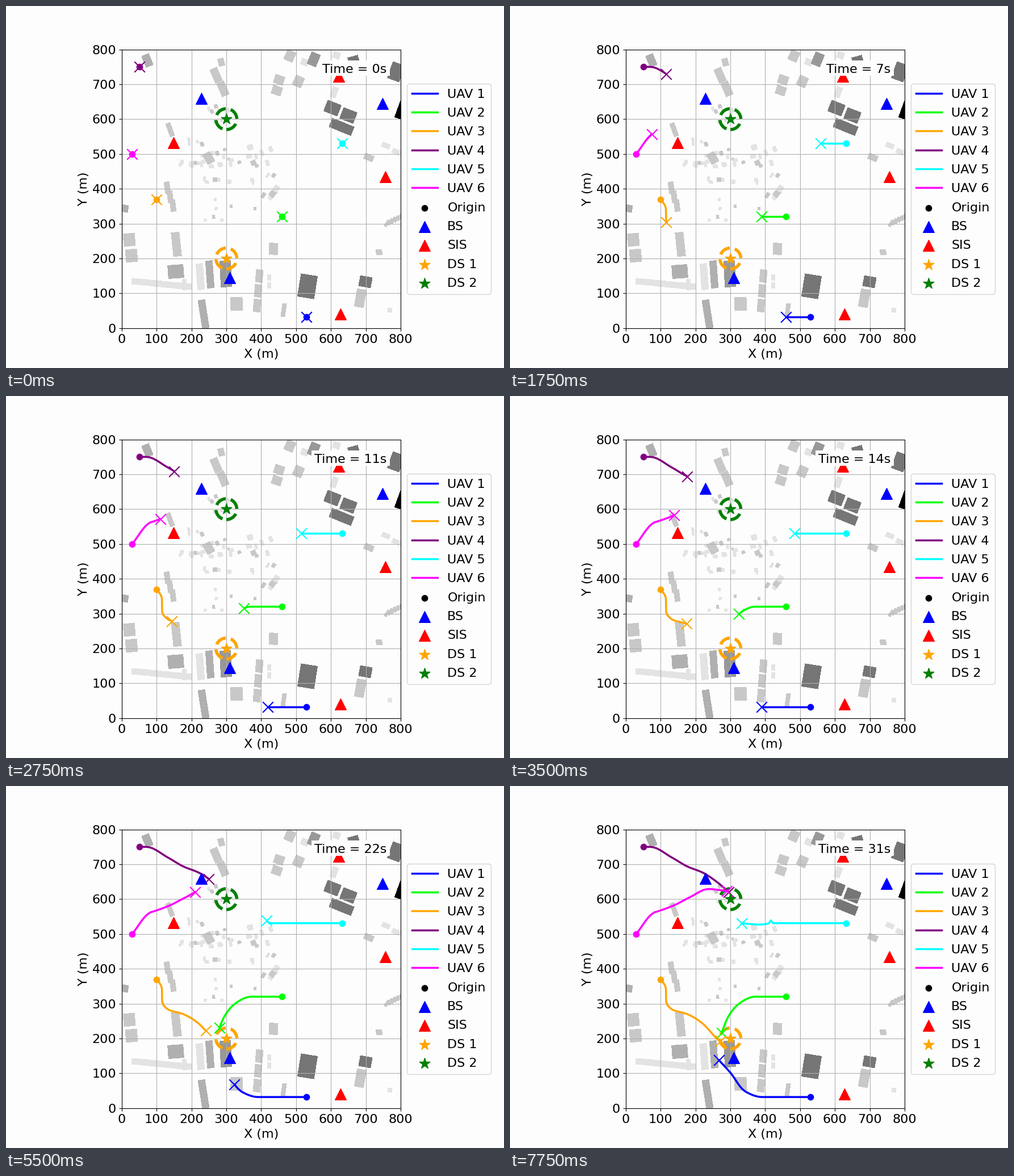
A matplotlib script for the animation above (8 s loop, 877 by 638 pixels).

```python
import math
import random

import matplotlib.pyplot as plt
import numpy as np
from matplotlib.animation import FuncAnimation
from matplotlib.patches import Circle, Rectangle

PAPER = "#fdfdfd"
PALE, LIGHT, MID, HEAVY, DARK = ("#e3e3e3", "#c8c8c8", "#b0b0b0", "#989898",
                                 "#767676")
STEPS = 32
SCALE = 638 * 0.77 / 800          # pixels per metre
LEFT, BOTTOM = 203.83, 567.82     # stage position of the map origin

plt.rcParams.update({"font.family": "DejaVu Sans", "font.size": 16,
                     "axes.facecolor": PAPER})
fig, ax = plt.subplots(figsize=(8.77, 6.38), dpi=100, facecolor=PAPER)


def block(shade, tilt, size, cx, cy):
    """Box in stage pixels, turned clockwise by tilt degrees."""
    c, s = math.cos(math.radians(tilt)), math.sin(math.radians(tilt))
    u = np.array([-1, 1, 1, -1]) * size[0] / 2
    v = np.array([-1, -1, 1, 1]) * size[1] / 2
    ax.fill((cx + u * c - v * s - LEFT) / SCALE,
            (BOTTOM - cy - u * s - v * c) / SCALE,
            color=shade, lw=0, antialiased=False, zorder=0.5)


def row(shade, tilt, size, start, step=(0, 0), count=1):
    for i in range(count):
        block(shade, tilt, size, start[0] + i * step[0],
              start[1] + i * step[1])


def district(count, xs, ys, tilt, largest=7):
    """Small houses spread at random over a rectangle."""
    for _ in range(count):
        size = random.uniform(3, largest), random.uniform(4, largest + 1)
        block(random.choice([PALE, PALE, LIGHT]), tilt + random.uniform(-6, 6),
              size, random.uniform(*xs), random.uniform(*ys))


# Old town: small houses
random.seed(4)
district(12, (305, 368), (274, 284), 0)
district(8, (338, 440), (304, 314), -3)
district(9, (320, 385), (225, 268), -18)
district(7, (375, 412), (262, 282), -20)
district(8, (424, 472), (245, 282), -18, 10)
district(8, (452, 476), (290, 338), 38, 10)
district(7, (318, 448), (340, 382), 0, 5)
district(8, (340, 395), (176, 222), -18, 6)

# Outer blocks
row(PALE, 4, (25, 10), (234, 486), (20, 2), 5)
row(PALE, -4, (12, 46), (342, 477))
row(PALE, 0, (8, 20), (314, 491))
row(PALE, 24, (14, 8), (669, 246), (18, 11), 2)
row(PALE, 20, (10, 18), (578, 152))
row(PALE, 22, (12, 11), (526, 99), (56, -12), 2)
row(PALE, 0, (7, 11), (463, 478), (0, 14), 2)
row(PALE, 10, (7, 7), (676, 536))

row(LIGHT, -4, (20, 22), (217, 412), (4, 28), 2)
row(LIGHT, -6, (14, 42), (300, 420))
row(LIGHT, -3, (21, 23), (406, 525))
row(LIGHT, 4, (12, 22), (446, 476), (-2, 26), 3)
row(LIGHT, 8, (7, 23), (489, 536))
row(LIGHT, 10, (16, 31), (624, 515))
row(LIGHT, 3, (15, 20), (471, 428))
row(LIGHT, -23, (13, 25), (370, 122), (12, 24), 2)
row(LIGHT, -15, (10, 13), (379, 99))
row(LIGHT, 18, (17, 15), (477, 149), (4, -19), 2)
row(LIGHT, 24, (16, 18), (515, 133), (-15, -45), 2)
row(LIGHT, 22, (16, 10), (639, 267))
row(LIGHT, -20, (8, 24), (289, 218))
row(LIGHT, -7, (9, 20), (284, 320), (5, 16), 3)
row(LIGHT, -30, (14, 19), (357, 268))
row(LIGHT, 35, (4.4, 12), (671, 383), (5.5, -2.6), 5)
row(LIGHT, -5, (10, 9), (657, 434))

row(MID, -22, (13, 21), (249, 96))
row(MID, 5, (10, 12), (210, 357))
row(MID, -9, (12, 50), (348, 543))
row(MID, -4, (12, 48), (359, 473))
row(MID, -4, (27, 23), (299, 468))
row(HEAVY, 22, (16, 22), (542, 94))
row(HEAVY, -3, (19, 46), (387, 472))

row(DARK, 21, (25, 20), (575, 180), (28, 13), 2)
row(DARK, 22, (41, 16), (591, 213))
row(DARK, 9, (29, 40), (531, 494))
row(DARK, 10, (21, 18), (633, 486))
row(DARK, 20, (22, 30), (687, 116))
row(DARK, -15, (18, 12), (612, 95))
row("black", 20, (14, 34), (697, 182))


def glide(stops):
    """Smooth path through (second, x, y) stops that never overshoots."""
    stops = np.array(stops, float)
    t, p = stops[:, 0], stops[:, 1:]
    slope = np.diff(p, axis=0) / np.diff(t)[:, None]
    a, b = slope[:-1], slope[1:]
    same = a * b > 0
    mean = np.where(same, 2 * a * b / np.where(same, a + b, 1), 0)
    m = np.vstack([slope[:1], mean, slope[-1:]])
    now = np.arange(STEPS)
    k = np.clip(np.searchsorted(t, now, "right") - 1, 0, len(t) - 2)
    h = (t[k + 1] - t[k])[:, None]
    u = (now - t[k])[:, None] / h
    ease = u * u * (3 - 2 * u)
    return (p[k] + (p[k + 1] - p[k]) * ease
            + h * u * (1 - u) * ((1 - u) * m[k] - u * m[k + 1]))


flights = []


def fly(color, *stops):
    path = glide(stops)
    trail, = ax.plot([], [], color=color, lw=2.5, zorder=2,
                     label=f"UAV {len(flights) + 1}")
    cross = ax.scatter(*path[0], s=180, marker="x", color=color, zorder=3)
    ax.scatter(*path[0], s=55, color=color, zorder=3)
    flights.append((trail, cross, path))


fly("blue", (0, 530, 32), (14, 390, 32), (19, 343, 48), (26, 300, 102),
    (31, 267, 138))
fly("lime", (0, 460, 320), (9, 370, 320), (14, 325, 300), (19, 293, 261),
    (24, 276.5, 219), (31, 276, 216))
fly("orange", (0, 100, 370), (3, 115, 345), (7, 116, 305), (10, 135, 282),
    (14, 174, 271), (19, 217, 246), (26, 264, 197), (31, 273, 193))
fly("purple", (0, 50, 750), (2, 70, 750), (9, 133, 719), (14, 176, 694),
    (19, 223, 675), (26, 279, 635), (31, 295, 620))
fly("cyan", (0, 632, 531), (21, 422, 531), (22, 416, 539), (23, 410, 530),
    (26, 381, 527), (31, 332, 531))
fly("magenta", (0, 30, 500), (8, 82, 562), (9, 92, 565), (14, 138, 582),
    (19, 183, 605), (25, 237, 629), (31, 290, 623))


def stations(label, color, marker, *spots, size=200):
    xs, ys = zip(*spots) if spots else ([], [])
    ax.scatter(xs, ys, s=size, color=color, marker=marker, label=label,
               zorder=4)


stations("Origin", "black", "o", size=55)
stations("BS", "blue", "^", (227.5, 659), (748.5, 645), (310, 145))
stations("SIS", "red", "^", (148.5, 532), (756, 434.5), (627.5, 41),
         (622.5, 722))
for name, color, y in [("DS 1", "orange", 200), ("DS 2", "green", 600)]:
    stations(name, color, "*", (300, y))
    ax.add_patch(Circle((300, y), 30, fill=False, ec=color, lw=4, ls="--",
                        zorder=1.8))

# Clock with its backing plate
plate = Rectangle((0, 725), 0, 43.5, color=PAPER, lw=0, zorder=5)
ax.add_patch(plate)
clock = ax.text(0.95, 0.948, "", transform=ax.transAxes, ha="right", va="top",
                zorder=6)

ax.set(xlim=(0, 800), ylim=(0, 800), aspect="equal",
       xticks=range(0, 801, 100), yticks=range(0, 801, 100))
ax.set_xlabel("X (m)", labelpad=5)
ax.set_ylabel("Y (m)", labelpad=3)
ax.grid(True)
ax.legend(loc="center left", bbox_to_anchor=(1, 0.5), labelspacing=0.6)


def draw(i):
    for trail, cross, path in flights:
        trail.set_data(*path[:i + 1].T)
        cross.set_offsets(path[i:i + 1])
    clock.set_text(f"Time = {i}s")
    left = 567 if i < 10 else 544
    plate.set_x(left)
    plate.set_width(769 - left)


anim = FuncAnimation(fig, draw, frames=STEPS, interval=250, repeat=True,
                     repeat_delay=0)
plt.show()
```
